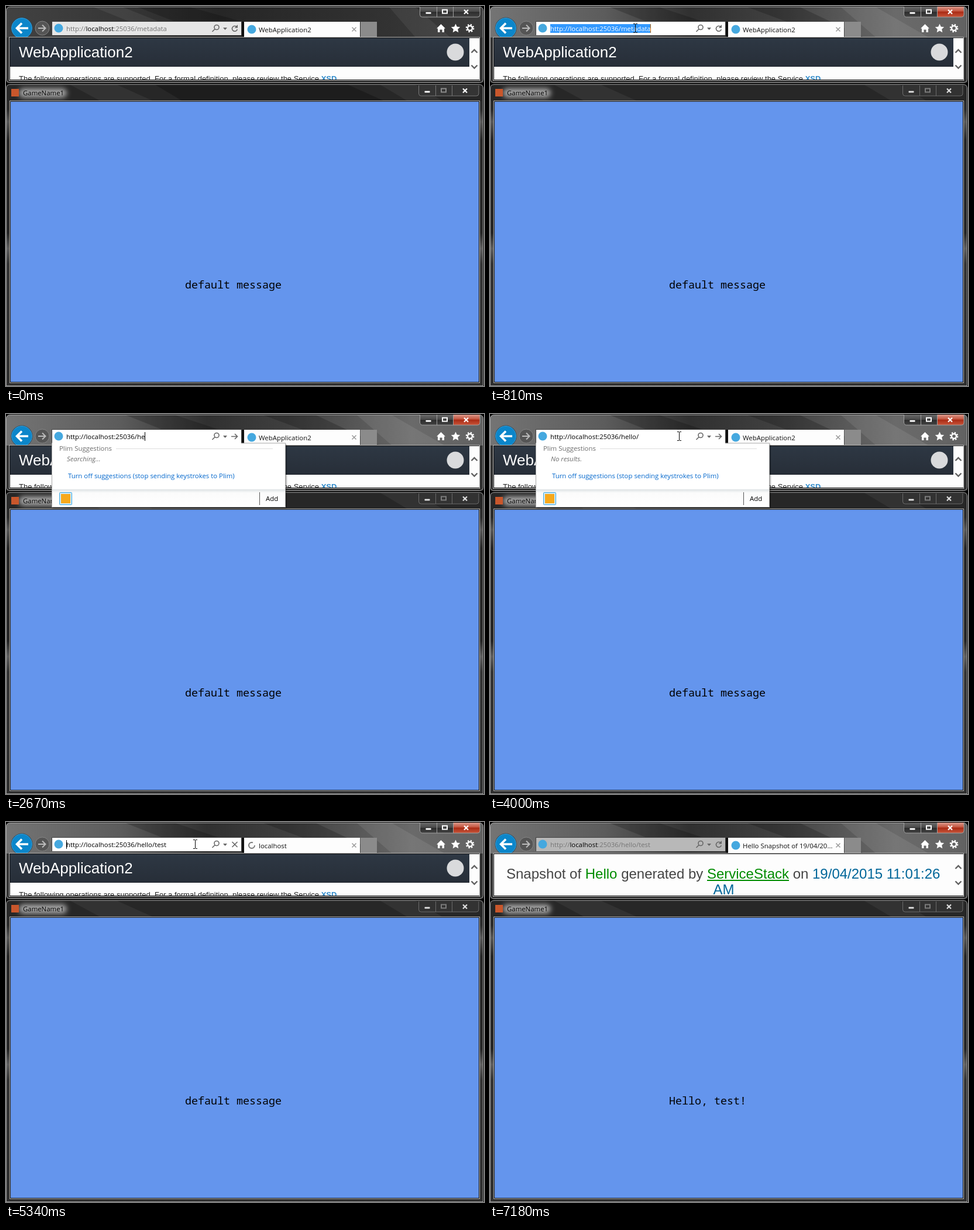
Animation of 817 by 651 pixels, one loop 8 s. Source, as an HTML page:

```html
<!DOCTYPE html>
<html lang="en">
<head>
<meta charset="utf-8">
<title>Browser and game window</title>
<style>
html, body { margin: 0; width: 100%; height: 100%; overflow: hidden; background: #000; }
svg { display: block; }
text { white-space: pre; }
.ui { font: 11.4px "Open Sans", "Noto Sans", sans-serif; }
.page { font-family: "Liberation Sans", Arial, sans-serif; }
.game { font: 18.35px "Noto Sans Mono", "DejaVu Sans Mono", monospace; }
.line { fill: none; stroke-width: 1; }
.glyph { fill: none; stroke: #666; stroke-width: 1.6; }
.crisp { shape-rendering: crispEdges; }
</style>
</head>
<body>
<svg width="817" height="651" viewBox="0 0 817 651">
  <defs>
    <linearGradient id="idle">
      <stop offset="0" stop-color="#424242"/><stop offset=".25" stop-color="#363636"/>
      <stop offset=".45" stop-color="#262626"/><stop offset=".75" stop-color="#303030"/>
      <stop offset="1" stop-color="#3c3c3c"/>
    </linearGradient>
    <linearGradient id="lit">
      <stop offset="0" stop-color="#747474"/><stop offset=".24" stop-color="#5c5c5c"/>
      <stop offset=".42" stop-color="#303030"/><stop offset=".6" stop-color="#404040"/>
      <stop offset=".85" stop-color="#6a6a6a"/><stop offset="1" stop-color="#626262"/>
    </linearGradient>
    <linearGradient id="side" x2="0" y2="1">
      <stop offset="0" stop-color="#2c2c2c"/><stop offset=".08" stop-color="#2c2c2c"/>
      <stop offset=".12" stop-color="#5a5a5a"/><stop offset=".18" stop-color="#262626"/>
      <stop offset=".48" stop-color="#262626"/><stop offset=".53" stop-color="#606060"/>
      <stop offset=".58" stop-color="#343434"/><stop offset="1" stop-color="#2e2e2e"/>
    </linearGradient>
    <linearGradient id="head" x2="0" y2="1">
      <stop offset="0" stop-color="#2e3844"/><stop offset="1" stop-color="#272e38"/>
    </linearGradient>
    <linearGradient id="red" x2="0" y2="1">
      <stop offset="0" stop-color="#dc9a8c"/><stop offset=".45" stop-color="#c4533d"/>
      <stop offset=".5" stop-color="#a92a14"/><stop offset="1" stop-color="#c8553a"/>
    </linearGradient>
    <linearGradient id="gray" x2="0" y2="1">
      <stop offset="0" stop-color="#6a6a6a"/><stop offset=".48" stop-color="#484848"/>
      <stop offset=".5" stop-color="#2c2c2c"/><stop offset="1" stop-color="#424242"/>
    </linearGradient>
    <linearGradient id="strip" x2="0" y2="1">
      <stop offset="0" stop-color="#dde2e4"/><stop offset=".2" stop-color="#fbfbfb"/>
      <stop offset="1" stop-color="#fff"/>
    </linearGradient>
    <filter id="blur" x="-30%" y="-60%" width="160%" height="220%"><feGaussianBlur stdDeviation="4"/></filter>
    <filter id="shade"><feGaussianBlur stdDeviation="1.5"/></filter>
    <clipPath id="view"><rect x="7" y="55" width="802" height="71"/></clipPath>
    <path id="panel" d="M.5 0V14q0 4 4 4H99q4 0 4-4V0M29.5 0V18M57.5 0V18"/>
    <g id="marks">
      <path d="M10 11h10" stroke="#222" stroke-width="5"/>
      <path d="M10.500 11h9" stroke="#fff" stroke-width="3"/>
    </g>
    <path id="cross" d="M76 5.500l7 7m0-7l-7 7" fill="none" stroke="#fff" stroke-width="2.200"/>
    <rect id="box" x="39" y="5.500" width="8" height="6" fill="none" stroke-width="2"/>
  </defs>

  <!-- browser frame -->
  <rect x=".5" y="1.500" width="815" height="130" rx="6" fill="url(#idle)"/>
  <g id="idleGlass">
    <path d="M150 2h50l62 25h-50zM655 2h45l60 52h-60z" fill="#fff" opacity=".06"/>
    <path d="M225 2h90l90 25H290z" fill="#000" opacity=".2"/>
  </g>
  <g id="litGlass">
    <rect x=".5" y="1.500" width="815" height="130" rx="6" fill="url(#lit)"/>
    <path d="M205 2h85l75 25H268zM440 2h90l110 52h-60z" fill="#000" opacity=".2"/>
    <path d="M600 2h60l90 52h-90z" fill="#fff" opacity=".08"/>
  </g>
  <rect x="1" y="54" width="815" height="77" fill="#303030"/>
  <rect class="line" x=".5" y="1.500" width="815" height="130" rx="6" stroke="#a8a8a8"/>
  <g transform="translate(707 1)">
    <path d="M0 0h103v14q0 4-4 4H4q-4 0-4-4z" fill="url(#gray)"/>
    <path id="closeRed" d="M57.500 0H103v14q0 4-4 4H57.500z" fill="url(#red)"/>
    <use href="#panel" fill="none" stroke="#a0a0a0"/><use href="#marks"/><use href="#cross"/>
    <use href="#box" stroke="#fff"/>
  </g>

  <!-- toolbar -->
  <circle cx="27" cy="38" r="18.500" fill="#23445a"/>
  <circle cx="27" cy="38" r="17.300" fill="#0c86ca" stroke="#39a1dc"/>
  <path d="M38 38H19m8-8.500L18.500 38l8.500 8.500" fill="none" stroke="#fff" stroke-width="3.600"/>
  <circle cx="62" cy="38" r="12" fill="#555" stroke="#858585"/>
  <path d="M55 38h12m-5-5.500 5.500 5.500-5.500 5.500" fill="none" stroke="#bbb" stroke-width="2"/>
  <g class="crisp">
    <rect x="78" y="26" width="325" height="24" fill="#444"/>
    <rect id="bar" x="79" y="27" width="323" height="23"/>
    <rect x="403" y="27" width="4" height="26" fill="#111"/>
    <rect x="407" y="27" width="198" height="27" fill="#fdfdfd"/>
    <rect x="606" y="27" width="28" height="26" fill="#8b8b8b"/>
  </g>
  <circle cx="90" cy="38" r="7.500" fill="#45a8df"/>
  <rect id="sel" y="31" height="15" fill="#39f"/>
  <text id="url" class="ui" x="103" y="43"><tspan>http://</tspan><tspan>localhost</tspan><tspan>:25036/</tspan><tspan id="path"></tspan></text>
  <rect id="caret" class="crisp" y="31" width="1" height="15"/>
  <circle class="glyph" cx="360" cy="36.500" r="4"/>
  <path class="glyph" d="M357 39.500l-4.500 4.500"/>
  <path d="M371 37h7l-3.500 4z" fill="#666"/>
  <g id="refresh"><path class="glyph" d="M394.500 36a4.500 4.500 0 1 0 .8 4"/><path d="M396 32v5.500h-5.500z" fill="#666"/></g>
  <path id="go" class="glyph" d="M385 38.500h10m-4-4.500 4.500 4.500-4.500 4.500"/>
  <path id="stop" class="glyph" d="M386.500 34l9 9m0-9l-9 9"/>
  <circle id="tabDot" cx="420" cy="40" r="7.500" fill="#45a8df"/>
  <circle id="spinner" cx="420" cy="40" r="5" fill="none" stroke="#777" stroke-width="2" stroke-dasharray="25 6.400"/>
  <text id="tab" class="ui" x="432" y="45" fill="#111"></text>
  <path d="M591.500 36.500l7 7m0-7l-7 7" fill="none" stroke="#999" stroke-width="1.500"/>
  <g fill="#fff">
    <path d="M743.500 31l7.500 7.500h-2V45h-3.500v-4.500h-4V45H738v-6.500h-2z"/>
    <path d="M768.500 30.500l2.300 5 5.400.6-4 3.700 1.100 5.400-4.800-2.700-4.800 2.700 1.100-5.400-4-3.700 5.400-.6z"/>
    <g fill="none" stroke="#fff"><circle cx="793" cy="38" r="4" stroke-width="2.400"/><circle cx="793" cy="38" r="6" stroke-width="2.600" stroke-dasharray="2.350 2.362"/></g>
  </g>

  <!-- web page -->
  <rect class="crisp" x="5" y="53" width="805" height="75" fill="#b8b8b8"/>
  <rect class="crisp" x="6" y="54" width="803" height="73" fill="#111"/>
  <g class="page" clip-path="url(#view)">
    <rect x="7" y="55" width="802" height="72" fill="#fdfdfd"/>
    <g id="meta">
      <rect x="7" y="54" width="785" height="50" fill="url(#head)"/>
      <path d="M7 103.500h785" stroke="#1b2028"/>
      <text x="22" y="88" font-size="26" fill="#fff">WebApplication2</text>
      <circle cx="768" cy="79" r="14.500" fill="#d9dadc"/>
      <text x="22" y="129" font-size="13" fill="#222">The following operations are supported. For a formal definition, please review the Service <tspan font-weight="bold" fill="#308bcb">XSD</tspan></text>
    </g>
    <g id="snap" font-size="24" fill="#444">
      <text x="28" y="97">Snapshot of <tspan fill="#008c00">Hello</tspan> generated by <tspan fill="#008c00">ServiceStack</tspan> on <tspan fill="#069">19/04/2015 11:01:26</tspan></text>
      <path class="crisp" d="M371 100h140" stroke="#008c00" stroke-width="2"/>
      <text x="399.500" y="124" text-anchor="middle" fill="#069">AM</text>
    </g>
    <path d="M795.500 80l5-5 5 5M795.500 101.500l5 5 5-5" fill="none" stroke="#606060" stroke-width="2.400"/>
  </g>

  <!-- game window -->
  <rect x=".5" y="134.500" width="815" height="530" rx="6" fill="url(#side)"/>
  <path d="M2 163V140q0-5 5-5H809q5 0 5 5v23z" fill="#272727"/>
  <path d="M110 135h80l60 27h-90zM640 135h60l45 27h-60z" fill="#fff" opacity=".05"/>
  <path id="gameShade" d="M255 135h330l60 27H300z" fill="#000" opacity=".25"/>
  <path class="line" d="M.5 651V141q0-6.500 6.500-6.500H809q6.500 0 6.500 6.500V651" stroke="#a0a0a0"/>
  <rect x="22" y="141" width="82" height="16" rx="8" fill="#a4a4a4" filter="url(#blur)"/>
  <rect x="9" y="142" width="13" height="13" fill="#c9572c"/>
  <text class="ui" x="29" y="153">GameName1</text>
  <g id="gameButtons" transform="translate(705 136)">
    <path d="M0 0h103v14q0 4-4 4H4q-4 0-4-4z" fill="#343434"/>
    <use href="#panel" fill="none" stroke="#777"/><use href="#marks"/><use href="#cross"/>
    <use href="#box" stroke="#8a8a8a"/>
  </g>
  <g class="crisp">
    <rect x="6" y="162" width="804" height="484" fill="#b0b0b0"/>
    <rect x="7" y="163" width="802" height="482" fill="#111"/>
    <rect x="8" y="164" width="800" height="480" fill="#6495ed"/>
    <rect x="1" y="650" width="815" height="1" fill="#999"/>
  </g>
  <text id="msg" class="game" x="306" y="484"></text>

  <!-- suggestions -->
  <g id="popup">
    <rect x="80" y="52" width="399" height="109" fill="#000" opacity=".5" filter="url(#shade)"/>
    <rect x="78.500" y="50" width="399" height="109.500" fill="#fff" stroke="#aaa"/>
    <rect x="79" y="27" width="323" height="0"/>
    <rect x="79" y="49" width="323" height="2" fill="#fff"/>
    <path class="line" d="M188 59.500h268" stroke="#ddd"/>
    <rect x="79" y="129" width="398" height="30" fill="url(#strip)"/>
    <path class="line" d="M433.500 134v22" stroke="#555"/>
    <rect x="91.500" y="134.500" width="21" height="21" rx="1" fill="#cdeafb" stroke="#3ca5dc"/>
    <rect x="94" y="137" width="16" height="16" fill="#f7a91c"/>
    <g class="ui">
      <text x="91" y="63" fill="#6d6d6d">Plim Suggestions</text>
      <text id="hint" x="104" y="81" fill="#6d6d6d" font-style="italic"></text>
      <text x="106" y="110" fill="#06c">Turn off suggestions (stop sending keystrokes to Plim)</text>
      <text x="444" y="149">Add</text>
    </g>
  </g>

  <path id="beam" class="crisp" d="M-3-7.500H0M1-7.500h3M-3 7.500H0M1 7.500h3M.5-7V7" fill="none" stroke="#000"/>
  <path id="arrow" d="M.5.500v16l3.700-3.500 2.700 6 2.400-1-2.600-5.800H11.500z" fill="#fff" stroke="#000"/>
</svg>
<script>
const LOOP = 8000, URL_X = 103, PATH_X = 224, END_X = 275;
const $ = id => document.getElementById(id);
const show = (id, on) => { $(id).style.display = on ? '' : 'none'; };

// Each step lists only what changes at that time.
const steps = [
  [0, { path: 'metadata', ink: 'dim', bar: '#e6e6e6', sel: null, caret: null, beam: null, arrow: null,
        lit: false, icon: 'refresh', tab: 'WebApplication2', snap: false, popup: false, hint: '', msg: 'default message' }],
  [280, { arrow: [294, 50] }],
  [530, { arrow: null, beam: [262, 42], ink: 'black' }],
  [810, { lit: true, bar: '#fff', sel: 'all', caret: 'end', beam: [248, 38] }],
  [1090, { beam: [223, 38] }],
  [1370, { sel: null, caret: 'path', beam: [228, 38] }],
  [1620, { sel: 'path', caret: 'end', beam: [322, 38] }],
  [1880, { beam: [323, 38] }],
  [2140, { caret: null }],
  [2420, { path: 'h', sel: null, caret: 'end', icon: 'go', popup: true, hint: 'Searching...' }],
  [2670, { path: 'he', beam: null }],
  [2950, { path: 'hell', beam: [323, 38] }],
  [3200, { path: 'hello' }],
  [3480, { path: 'hello/' }],
  [3740, { hint: 'No results.' }],
  [4000, { caret: null }],
  [4280, { path: 'hello/t', caret: 'end', hint: 'Searching...' }],
  [4530, { path: 'hello/te' }],
  [4810, { path: 'hello/test', beam: null }],
  [5060, { beam: [323, 38] }],
  [5340, { caret: 'start', popup: false, icon: 'stop', tab: 'localhost' }],
  [5600, { caret: null, beam: null, arrow: [321, 37], bar: '#e6e6e6', icon: 'refresh',
           tab: 'Hello Snapshot of 19/04/20...', snap: true, msg: 'Hello, test!' }],
  [7180, { arrow: null, ink: 'dim', bar: '#b8b8b8' }]
];

function place(id, pos) {
  show(id, pos);
  if (pos) $(id).setAttribute('transform', `translate(${pos})`);
}

function drawUrl(s) {
  $('path').textContent = s.path;
  [...$('url').children].forEach((part, i) => {
    const chosen = s.sel === 'all' || (s.sel === 'path' && i === 3);
    part.style.fill = chosen ? '#fff' : s.ink === 'dim' && i !== 1 ? '#757575' : '#000';
  });
  show('sel', s.sel);
  const left = s.sel === 'all' ? URL_X : PATH_X;
  $('sel').setAttribute('x', left);
  $('sel').setAttribute('width', END_X - left);
  show('caret', s.caret);
  const end = s.sel ? END_X - 1 : Math.round(URL_X + $('url').getComputedTextLength());
  $('caret').setAttribute('x', { start: URL_X, path: PATH_X, end }[s.caret] || 0);
  $('caret').style.fill = s.sel ? '#c60' : '#000';
}

function draw(s) {
  drawUrl(s);
  $('bar').style.fill = s.bar;
  $('tab').textContent = s.tab;
  $('hint').textContent = s.hint;
  $('msg').textContent = s.msg;
  ['refresh', 'go', 'stop'].forEach(id => show(id, s.icon === id));
  show('spinner', s.icon === 'stop');
  show('tabDot', s.icon !== 'stop');
  show('litGlass', s.lit);
  show('idleGlass', !s.lit);
  show('closeRed', s.lit);
  show('gameShade', !s.lit);
  $('gameButtons').style.opacity = s.lit ? .85 : 1;
  show('meta', !s.snap);
  show('snap', s.snap);
  show('popup', s.popup);
  place('beam', s.beam);
  place('arrow', s.arrow);
}

let last = -1;
function tick() {
  const t = performance.now() % LOOP;
  const past = steps.filter(([at]) => at <= t);
  if (past.length !== last) {
    last = past.length;
    draw(Object.assign({}, ...past.map(([, change]) => change)));
  }
  requestAnimationFrame(tick);
}
tick();
</script>
</body>
</html>
```
